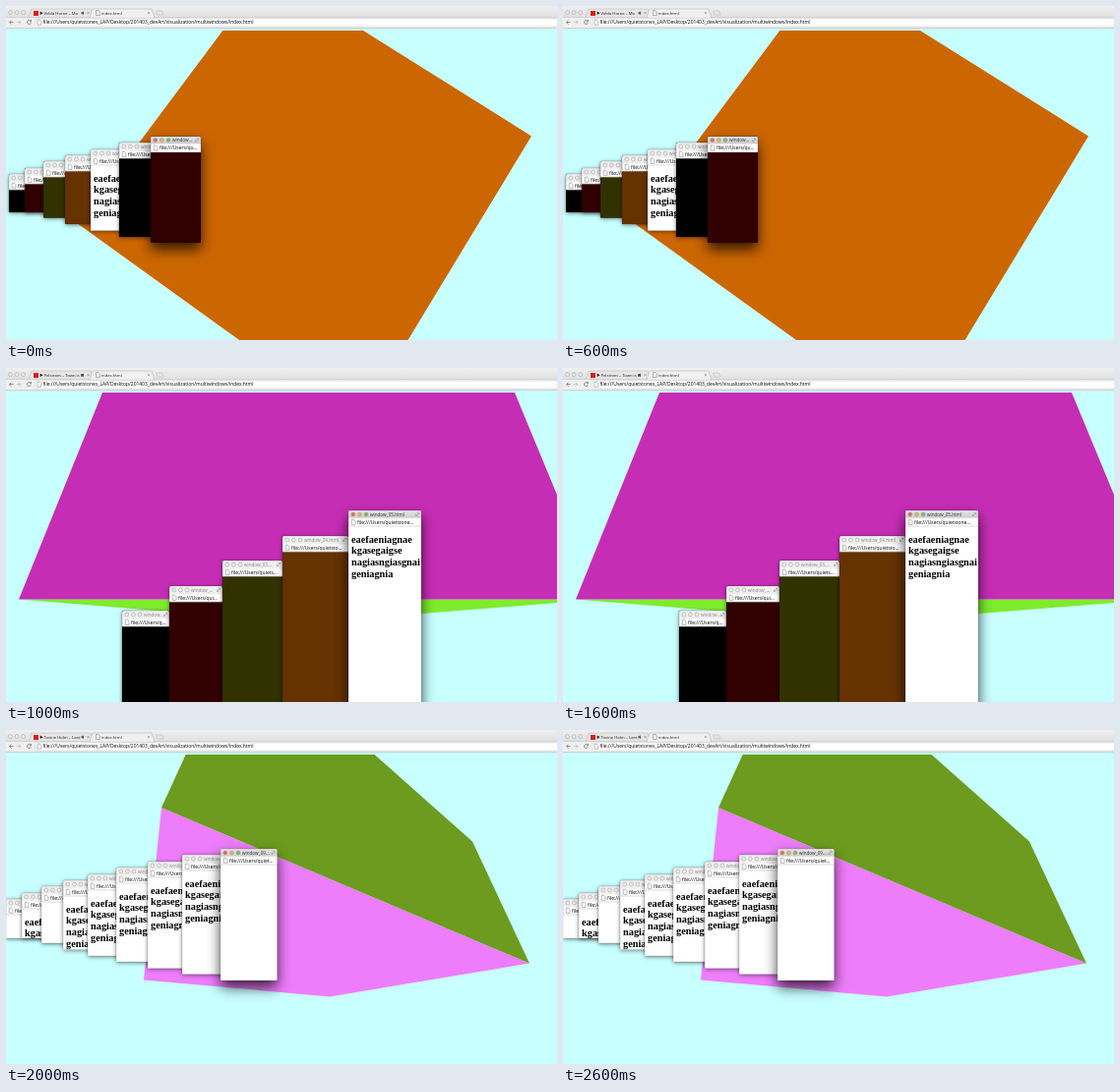
An HTML page for the animation above (3 s loop, 560 px wide and 340 px high).

```html
<!DOCTYPE html>
<html lang="en">
<head>
<meta charset="utf-8">
<title>Multiwindows</title>
<style>
  html, body { margin: 0; width: 100%; height: 100%; overflow: hidden; background: #c8ffff; }
  svg { display: block; }
  text { font-family: "Open Sans", "Noto Sans", sans-serif; font-size: 4.95px; fill: #000; white-space: pre; }
  .tab { font-size: 4.2px; fill: #222; }
  .body text { font: bold 10.3px "Liberation Serif", "Times New Roman", serif; }
  .title { font-size: 4.6px; fill: #888; }
  .active .title { fill: #333; }
  .shadow { filter: drop-shadow(0 1px 2px rgba(0, 0, 0, .5)); }
  .active .shadow { filter: drop-shadow(0 7px 7px rgba(0, 0, 0, .75)); }
  .scene { visibility: hidden; animation: show 3s step-end infinite; }
  @keyframes show {
    0% { visibility: visible; }
    33.3333%, 100% { visibility: hidden; }
  }
</style>
</head>
<body>
<svg id="stage" width="560" height="340" viewBox="0 0 560 340"></svg>
<script>
const WORDS = ['eaefaeniagnae', 'kgasegaigse', 'nagiasngiasgnai', 'geniagnia'];
const BLACK = '#000', RED = '#310000', OLIVE = '#323200', BROWN = '#653200', WHITE = '#fff';
const USER = 'quietstones_LAP';

const rect = (x, y, w, h, fill, more = '') =>
  `<rect x="${x}" y="${y}" width="${w}" height="${h}" fill="${fill}" ${more}/>`;
const text = (x, y, s, cls = '') => `<text x="${x}" y="${y}" class="${cls}">${s}</text>`;
const poly = (points, fill) => `<polygon points="${points}" fill="${fill}"/>`;
const line = (d, color = '#888', w = .7) =>
  `<path d="${d}" fill="none" stroke="${color}" stroke-width="${w}"/>`;

const lights = (x, y, colors) => colors.map((c, i) =>
  `<circle cx="${x + i * 6.6}" cy="${y}" r="2" fill="${c}" stroke="#999" stroke-width=".5"/>`).join('');

const pageIcon = (x, y) => line(`M${x} ${y}h2.4l1.4 1.4v3.6h-3.8z`, '#888', .6);
const cross = (x, y) => line(`M${x} ${y}l2 2m0-2l-2 2`, '#777', .6);

// o: x, y, w, h, fill, words (show text), title, url, active
function win(o) {
  const { x, y, w, h, fill } = o;
  const dots = o.active ? ['#e8665c', '#e5b54f', '#80b955'] : Array(3).fill('#ececec');
  const words = o.words ? WORDS.map((s, i) => text(3, 32.6 + i * 11.65, s)).join('') : '';
  return `<g class="${o.active ? 'active' : ''}">
    ${rect(x, y, w, h, fill, 'rx="1.5" class="shadow"')}
    <svg x="${x}" y="${y}" width="${w}" height="${h}">
      ${rect(0, 0, w, 12, o.active ? 'url(#bar)' : '#efefef', 'rx="1.5"')}
      ${rect(0, 7.5, w, 9, '#f1f1f1')}
      ${rect(1, 8.5, w - 1, 7, '#fff')}
      ${lights(4.8, 4, dots)}
      ${text(22, 5.7, o.title, 'title')}
      ${line(`M${w - 5.5} 5.5l3.2-3.2m-2 0h2v2m-3.2 -.8v2h2`, '#999', .6)}
      ${pageIcon(3.2, 9.3)}
      ${text(9, 13.8, 'file:///Users/' + o.url)}
      ${line(`M0 16.2h${w}`, '#bbb', .6)}
      ${rect(0, 16.5, w, h, fill)}
      <g class="body">${words}</g>
    </svg>
    ${rect(x, y, w, h, 'none', 'rx="1.5" stroke="#000" stroke-opacity=".25" stroke-width=".5"')}
  </g>`;
}

// rows: [x, y, w, bottom, fill, words]; the last one has the focus
function stack(rows) {
  return rows.map(([x, y, w, bottom, fill, words], i) => {
    const name = `window_0${i + 1}.html`;
    const fit = Math.floor((w - 30) / 2.5);
    return win({
      x, y, w, h: bottom - y, fill, words,
      title: fit >= 14 ? name : name.slice(0, Math.max(6, fit - 2)) + '...',
      url: USER.slice(0, Math.round((w - 44) / 3)) + '...',
      active: i === rows.length - 1
    });
  }).join('');
}

const scenes = [
  {
    tab: 'Velda Horne – Mo',
    shapes: poly('220.3,25 363,25 534,132.4 408.6,340 237,340 73.5,222', '#cc6600'),
    windows: [
      [3, 171, 48, 210, BLACK], [19, 165, 48, 210, RED], [38, 158, 49, 215.5, OLIVE],
      [60, 152, 49, 222, BROWN], [86, 146, 50, 228.5, WHITE, true],
      [115, 139, 50, 235, BLACK], [147, 132.6, 51, 241, RED]
    ]
  },
  {
    tab: 'Pelstrom – Town is B',
    shapes: poly('13,235.4 604,235.4 423,250 166,248', '#7feb2d') +
            poly('98,25 517,25 604,235.4 13,235.4', '#c62db5'),
    windows: [
      [118, 247, 48, 360, BLACK], [166, 222, 54, 360, RED], [220, 196, 61, 360, OLIVE],
      [281, 171, 67, 360, BROWN], [348, 145, 74, 360, WHITE, true]
    ]
  },
  {
    tab: 'Tovine Holm – Lant',
    shapes: poly('158,79 532,237.5 329,271.4 140,254.4', '#ee7dfb') +
            poly('182.7,25 374.5,25 474,113.4 532,237.5 158,79', '#6c9b1f'),
    windows: [
      [0, 172, 50, 212, WHITE], [16, 166, 51, 212, WHITE, true], [36, 159, 52, 217, WHITE],
      [58, 153, 53, 223.5, WHITE, true], [83, 147, 54, 230, WHITE, true],
      [112, 140, 55, 236, WHITE, true], [144, 134, 56, 242.4, WHITE, true],
      [179, 127, 57, 248.5, WHITE, true], [218, 121, 57.5, 255, WHITE]
    ]
  }
];

const browser = `
  ${rect(0, 0, 560, 13, 'url(#strip)')}
  ${lights(4.5, 6.6, Array(3).fill('#ececec'))}
  <path d="M23 12l3-9h60l3 9z" fill="#e6e6e6" stroke="#b4b4b4" stroke-width=".5"/>
  ${rect(0, 11.6, 560, 11.4, '#f0f0f0')}
  ${line('M0 11.6h560', '#bbb', .5)}
  <path d="M85 12l3-9h60l3 9z" fill="#f0f0f0" stroke="#aaa" stroke-width=".5"/>
  ${rect(86, 11.4, 64, 1, '#f0f0f0')}
  <path d="M152.5 5h6l1.6 4h-6z" fill="#e6e6e6" stroke="#b4b4b4" stroke-width=".5"/>
  ${rect(28, 5, 5, 5, '#d8201f')}
  <path d="M34.6 5.5l3 1.7-3 1.7z" fill="#222"/>
  ${rect(76.5, 6.2, 1.4, 2, '#555')}<path d="M77 7.2l2-2v4z" fill="#555"/>
  ${cross(82.5, 6.2)}
  ${pageIcon(91.5, 4.5)}
  ${text(97, 8.7, 'index.html', 'tab')}
  ${cross(144, 6.2)}
  ${rect(30, 13, 540, 8, '#fff', 'rx="1" stroke="#c4c4c4" stroke-width=".5"')}
  ${line('M7.5 16.6h-4m2-2l-2 2 2 2', '#777', .8)}
  ${line('M11 16.6h4m-2-2l2 2-2 2', '#bbb', .8)}
  ${line('M25 15.2a2 2 0 1 0 .4 2M25.5 14v1.8h-1.8', '#777', .8)}
  ${pageIcon(32, 14.2)}
  ${text(37.6, 18.4, `file:///Users/${USER}/Desktop/201403_devArt/visualization/multiwindows/index.html`)}
  ${line('M0 22.7h560', '#b0b0b0', .6)}`;

const gradient = (id, a, b) => `<linearGradient id="${id}" x2="0" y2="1">
  <stop stop-color="${a}"/><stop offset="1" stop-color="${b}"/></linearGradient>`;

document.getElementById('stage').innerHTML = `
  <defs>${gradient('bar', '#e6e6e6', '#bdbdbd')}${gradient('strip', '#f0f0f0', '#dedede')}</defs>
  ${rect(0, 0, 560, 340, '#c8ffff')}
  ${browser}
  ${scenes.map((s, i) => `<g class="scene" style="animation-delay:${i && i - 3}s">
    ${text(38.5, 8.7, s.tab, 'tab')}${s.shapes}${stack(s.windows)}</g>`).join('')}`;
</script>
</body>
</html>
```
